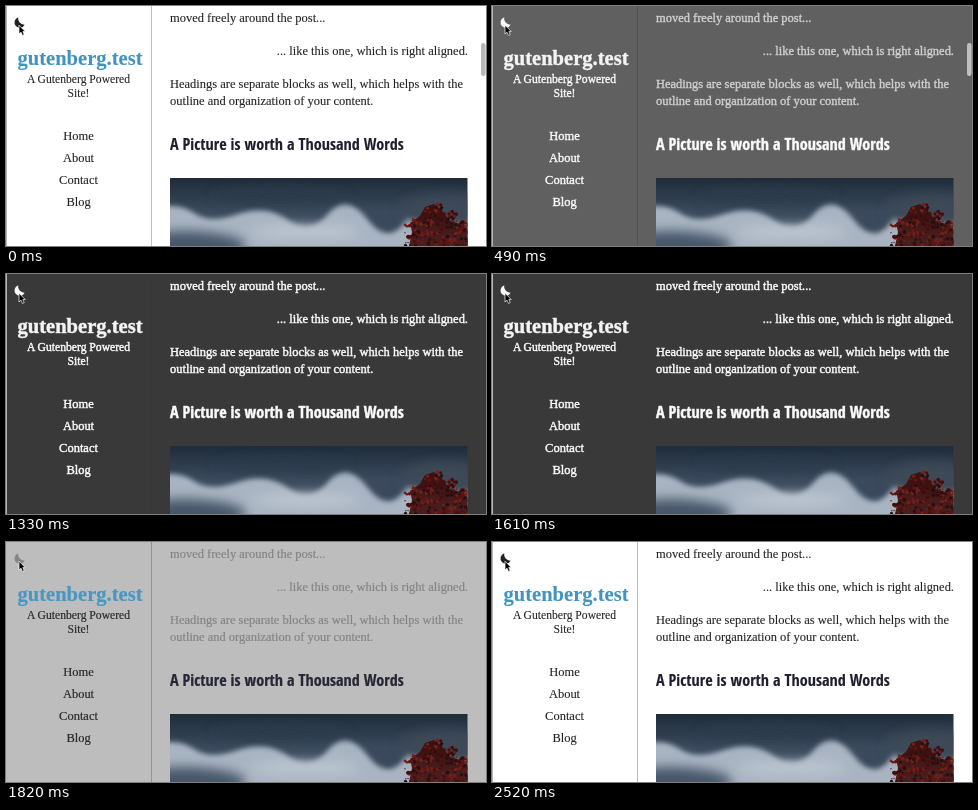
Animation of 480 by 240 pixels, one loop 2.59 s. Source, as an HTML page:

```html
<!DOCTYPE html>
<html lang="en">
<head>
<meta charset="utf-8">
<title>Dark mode toggle</title>
<style>
  html, body { margin: 0; height: 100%; overflow: hidden; }
  svg { display: block; width: 100%; height: 100%; background: var(--page); }
  text {
    font: 12.47px "Liberation Serif", serif;
    color: var(--body); fill: currentColor; stroke: currentColor; stroke-width: var(--weight);
  }
  .side text { text-anchor: middle; color: var(--side); }
  .side .tagline { font-size: 11.63px; }
  .side .title { font-size: 20.55px; font-weight: bold; color: var(--title); }
  #heading { font: bold 16px "Open Sans Condensed", "Open Sans", sans-serif; font-stretch: condensed; color: var(--heading); }
</style>
</head>
<body>
<svg viewBox="0 0 480 240">
  <defs>
    <linearGradient id="sky" x2="0" y2="1">
      <stop stop-color="#1f2c3a"/>
      <stop offset=".5" stop-color="#3a4a5c"/>
    </linearGradient>
    <filter id="soft" x="-50%" y="-50%" width="200%" height="200%"><feGaussianBlur stdDeviation="6"/></filter>
    <filter id="edge" x="-10%" y="-50%" width="120%" height="200%"><feGaussianBlur stdDeviation="2.5"/></filter>
    <clipPath id="frame"><path d="M164 172H461.5V240H164Z"/></clipPath>
  </defs>

  <path d="M0 0H1V240H0Z" fill="#b8b8b8"/>
  <path d="M145 0H146V240H145Z" fill="var(--divider)"/>

  <g class="side">
    <text class="title" x="74" y="58.5">gutenberg.test</text>
    <text class="tagline" x="72.5" y="77">A Gutenberg Powered</text>
    <text class="tagline" x="72.5" y="91">Site!</text>
    <text x="72.5" y="133.5">Home</text>
    <text x="72.5" y="155.5">About</text>
    <text x="72.5" y="177.5">Contact</text>
    <text x="72.5" y="200">Blog</text>
  </g>

  <text x="164" y="16">moved freely around the post...</text>
  <text x="462" y="48.5" text-anchor="end">... like this one, which is right aligned.</text>
  <text x="164" y="81.5">Headings are separate blocks as well, which helps with the</text>
  <text x="164" y="98.5">outline and organization of your content.</text>
  <text id="heading" x="164" y="144">A Picture is worth a Thousand Words</text>

  <g clip-path="url(#frame)">
    <path d="M164 172H462V240H164Z" fill="url(#sky)"/>
    <path d="M150 202Q172 196 188 207T232 208T282 214T322 208T362 214T402 211L480 216V260H150Z"
      fill="#a9b4c2" filter="url(#edge)"/>
    <g filter="url(#soft)">
      <ellipse cx="178" cy="240" rx="62" ry="15" fill="#46566a"/>
      <ellipse cx="300" cy="226" rx="55" ry="7" fill="#bcc5d0"/>
      <ellipse cx="275" cy="190" rx="70" ry="6" fill="#2c3b4c"/>
      <ellipse cx="440" cy="204" rx="46" ry="16" fill="#3c4856"/>
    </g>
    <path d="M403 240L406 226 404 217 414 210 419 201 428 198 437 206 444 215 454 218 464 224V240Z" fill="#3c0d0c" opacity=".9"/>
    <g id="leaves"></g>
  </g>

  <rect id="thumb" x="475" y="37" width="4.6" height="33" rx="2.3"/>
  <path d="M12.2 11.2A5.4 5.4 0 1 0 18.8 18.6A6.2 6.2 0 0 1 12.2 11.2Z" fill="var(--icon)"/>
  <path d="M13 19.2V28L15 26.2 16.5 29.4 18.2 28.6 16.8 25.6H19.3Z" fill="#000" stroke="#fff" stroke-width=".7"/>
</svg>

<script>
const LOOP = 2590, STEP = 70, TO_DARK = 240, TO_LIGHT = 1625;
const root = document.documentElement;
const heading = document.getElementById("heading");
const thumb = document.getElementById("thumb");

const clamp = x => Math.min(1, Math.max(0, x));

// CSS "ease": cubic-bezier(.25, .1, .25, 1)
function ease(x) {
  if (x <= 0 || x >= 1) return clamp(x);
  const bezier = (u, a, b) => 3 * u * (1 - u) ** 2 * a + 3 * u * u * (1 - u) * b + u ** 3;
  let low = 0, high = 1;
  for (let i = 0; i < 24; i++) {
    const mid = (low + high) / 2;
    if (bezier(mid, .25, .25) < x) low = mid; else high = mid;
  }
  return bezier(low, .1, 1);
}

const mix = (light, dark, k) =>
  `rgb(${light.map((c, i) => Math.round(c + (dark[i] - c) * k))})`;
const setColor = (name, light, dark, k) =>
  root.style.setProperty("--" + name, mix(light, dark, k));

function addLeaves() {
  let seed = 11;
  const random = () => (seed = seed * 16807 % 2147483647) / 2147483647;
  const tones = ["#5e1410", "#430e0c", "#74201a", "#241013"];
  let leaves = "";
  for (let i = 0; i < 220; i++) {
    const x = 399 + random() * 64;
    const top = 192 + Math.abs(x - 428) * (x < 428 ? .9 : .65) + random() * 5;
    const y = top + random() * (241 - top);
    leaves += `<circle cx="${x}" cy="${y}" r="${.6 + random() * 1.5}" fill="${tones[i % 4]}"/>`;
  }
  document.getElementById("leaves").innerHTML = leaves;
}

function draw(t) {
  const leaving = t >= TO_LIGHT;
  const elapsed = t - (leaving ? TO_LIGHT : TO_DARK);
  const darkness = p => leaving ? 1 - p : p;
  const progress = ease(elapsed / 500);
  const page = darkness(progress);
  const slow = darkness(leaving ? progress ** 1.5 : progress);
  const quick = darkness(ease(elapsed / (leaving ? 260 : 200)));

  const ink = [34, 34, 34], paper = [250, 250, 250];
  setColor("page", [255, 255, 255], [57, 57, 57], page);
  setColor("divider", [191, 191, 191], [55, 55, 55], page);
  setColor("body", ink, paper, slow);
  setColor("side", ink, paper, quick);
  setColor("heading", [30, 30, 46], paper, quick);
  setColor("title", [66, 147, 193], [244, 244, 244], quick);
  setColor("icon", ink, paper, leaving ? slow : quick);
  // Light text on a dark page looks heavier.
  root.style.setProperty("--weight", .1 + .35 * page);

  const onDark = page > .6;
  thumb.setAttribute("fill", onDark ? "#fff" : "#000");
  const strength = onDark ? .6 : .28 + .22 * clamp(page / .35);
  thumb.setAttribute("opacity", strength * (1 - clamp((t - 770) / 280)));
}

addLeaves();
// Keep the heading at the same line length whichever width of the face is available.
heading.style.fontSize = 16 * 234 / heading.getComputedTextLength() + "px";

function tick() {
  draw(Math.floor(performance.now() % LOOP / STEP) * STEP);
  requestAnimationFrame(tick);
}
tick();
</script>
</body>
</html>
```
